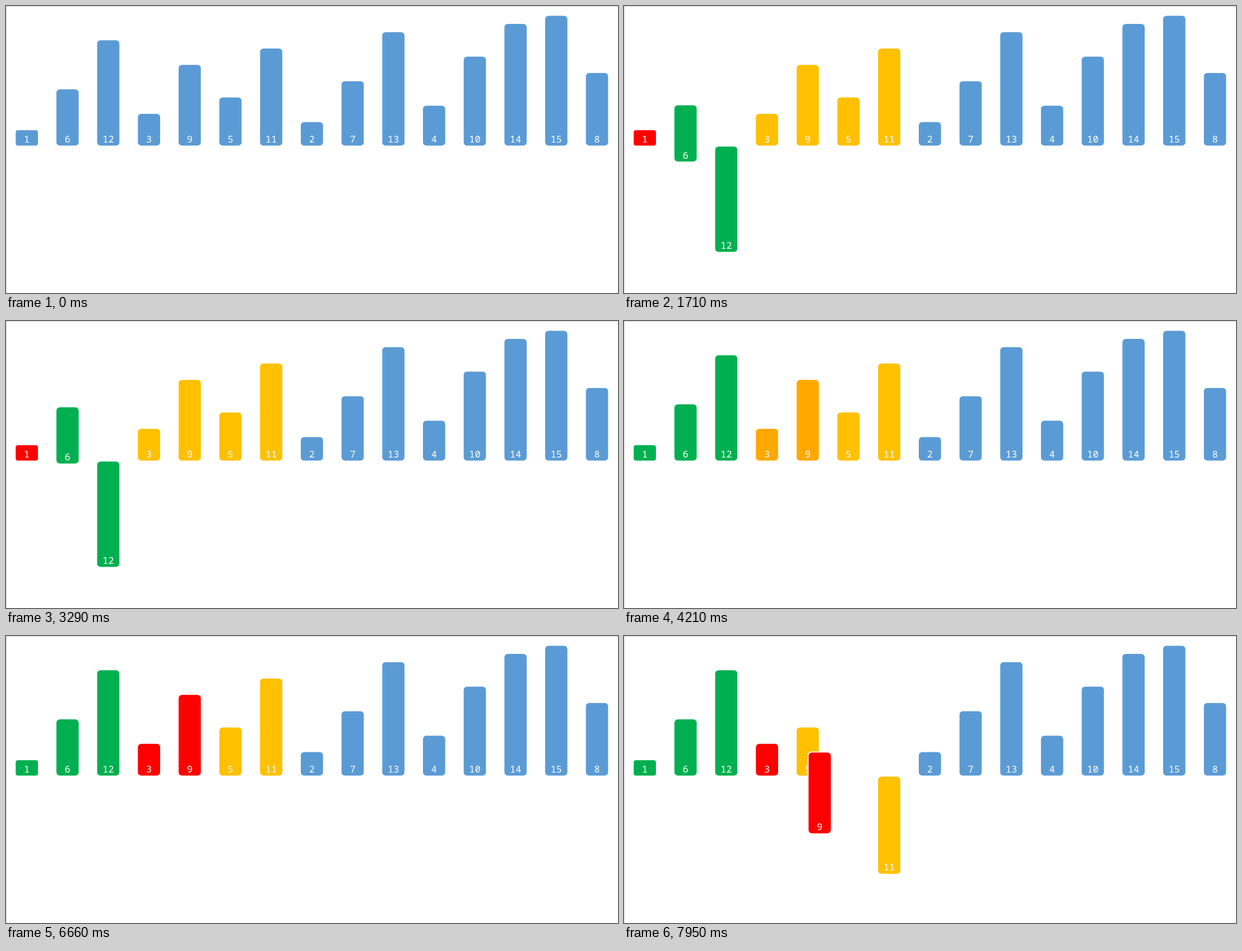
Write an HTML page with a canvas that moves like this. It is 1092x513 px and loops after 8 s.

```html
<!DOCTYPE html>
<html lang="en">
<head>
<meta charset="utf-8">
<title>Merge sort</title>
<style>
  html, body { margin: 0; width: 100%; height: 100%; overflow: hidden; background: #fff; }
  canvas { display: block; }
</style>
</head>
<body>
<canvas id="stage" width="1092" height="513"></canvas>
<script>
const ctx = document.getElementById('stage').getContext('2d');

const LOOP = 8000;
const VALUES = [1, 6, 12, 3, 9, 5, 11, 2, 7, 13, 4, 10, 14, 15, 8];
const LEFT = 17.3, PITCH = 72.67, WIDTH = 39.7;
const BASE = 249.5, OUTLINE = 1.8;
const MOVE = 300, FADE = 205;

const BLUE = [91, 155, 213];
const YELLOW = [255, 192, 0];
const GREEN = [0, 176, 80];
const RED = [255, 0, 0];

const barHeight = v => 27.4 + (v - 1) * 14.62;
const clamp = x => Math.max(0, Math.min(1, x));
const ease = x => x < 0.5 ? 2 * x * x : 1 - 2 * (1 - x) * (1 - x);
const mix = (a, b, p) => a + (b - a) * p;

const fades = [
  { at: 170, values: [1, 6, 12, 3, 9, 5, 11], color: YELLOW },
  { at: 560, values: [1, 6, 12], color: GREEN },
  { at: 860, values: [1], color: RED },
  { at: 3885, values: [1], color: GREEN },
  { at: 4185, values: [3, 9], color: RED }
];

const moves = [];

// Drop a run of bars together, then lift them one by one in sorted order.
function merge(at, period, first, count) {
  const run = order.slice(first, first + count);
  run.forEach(value => moves.push({ at, value, drop: 1 }));
  run.sort((a, b) => a - b).forEach((value, i) => {
    order[first + i] = value;
    moves.push({ at: at + (i + 1) * period, value, drop: 0, slot: first + i });
  });
}

const order = VALUES.slice();
merge(1144, 379, 1, 2);
merge(2281, 379, 0, 3);
merge(4555, 362, 3, 2);
merge(5641, 362, 5, 2);
merge(6738, 366, 3, 4);

function barsAt(t) {
  const bars = VALUES.map((value, slot) => ({ value, slot, drop: 0, color: BLUE }));
  const find = value => bars[VALUES.indexOf(value)];
  for (const f of fades) {
    const p = clamp((t - f.at) / FADE);
    for (const value of f.values) {
      const bar = find(value);
      bar.color = bar.color.map((c, i) => mix(c, f.color[i], p));
    }
  }
  for (const m of moves) {
    const bar = find(m.value);
    const p = ease(clamp((t - m.at) / MOVE));
    bar.drop = mix(bar.drop, m.drop, p);
    if (m.slot !== undefined) bar.slot = mix(bar.slot, m.slot, p);
  }
  return bars;
}

function roundRect(x, y, w, h, r, fill) {
  ctx.fillStyle = fill;
  ctx.beginPath();
  ctx.roundRect(x, y, w, h, r);
  ctx.fill();
}

function drawBar({ value, slot, drop, color }) {
  const h = barHeight(value);
  const x = LEFT + slot * PITCH;
  const bottom = BASE + drop * (h + OUTLINE);
  const y = bottom - h;
  const r = Math.min(WIDTH, h) * 0.15;
  const o = OUTLINE;
  roundRect(x - o, y - o, WIDTH + 2 * o, h + 2 * o, r + o, '#fff');
  roundRect(x, y, WIDTH, h, r, `rgb(${color.map(Math.round)})`);
  ctx.fillStyle = '#fff';
  ctx.fillText(value, x + WIDTH / 2, bottom - 5.5);
}

function draw(t) {
  ctx.fillStyle = '#fff';
  ctx.fillRect(0, 0, 1092, 513);
  ctx.fillStyle = '#d0d0d0';
  ctx.fillRect(0, 0, 1092, 1);
  ctx.fillRect(0, 0, 1, 513);
  ctx.font = '17px "Noto Sans Mono", "DejaVu Sans Mono", monospace';
  ctx.textAlign = 'center';
  ctx.textBaseline = 'alphabetic';
  // Bars further left lie on top.
  barsAt(t).reverse().forEach(drawBar);
}

const start = performance.now();
function frame() {
  draw((performance.now() - start) % LOOP);
  requestAnimationFrame(frame);
}
frame();
</script>
</body>
</html>
```
